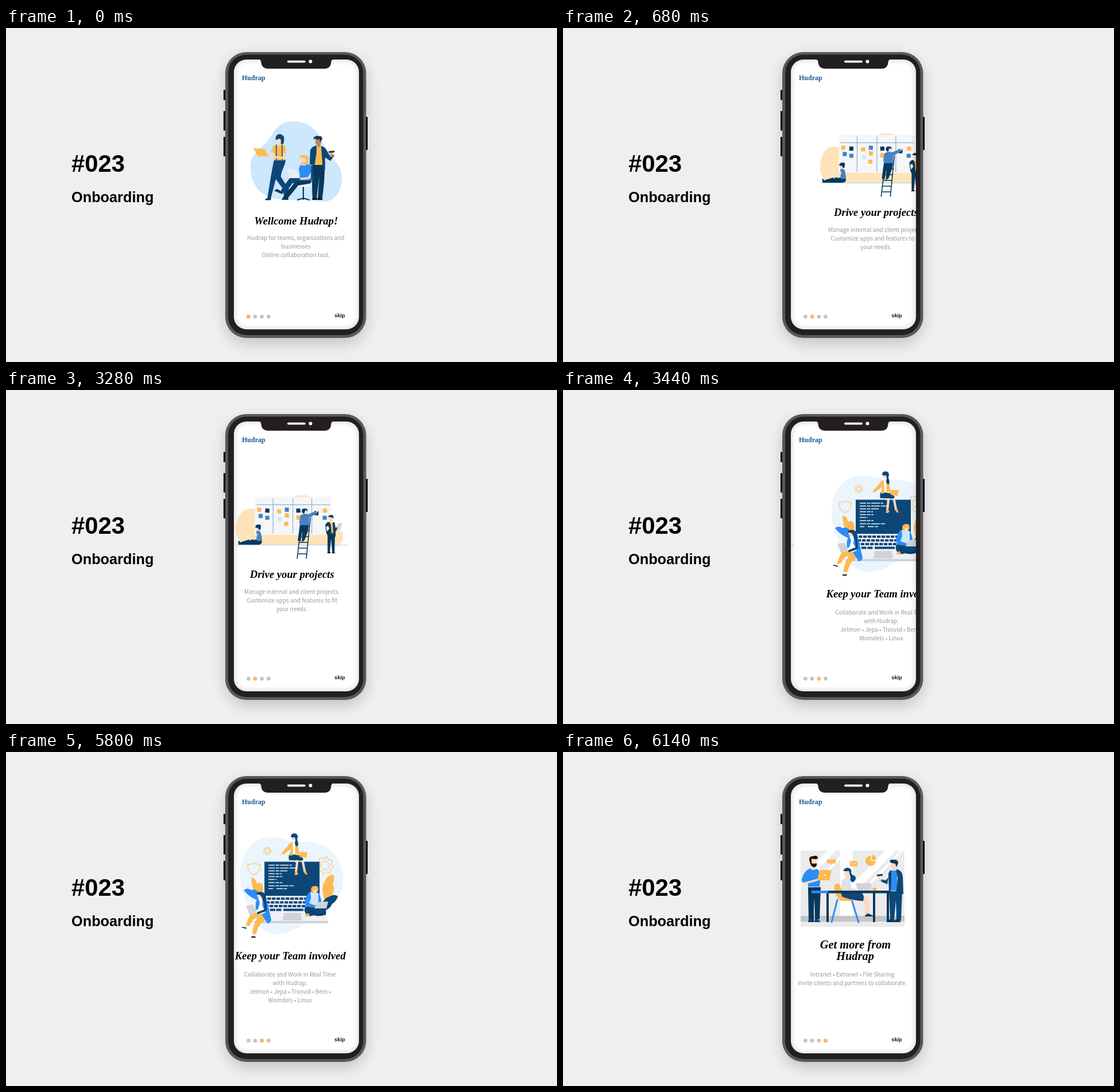
Animation, 960 px wide and 583 px high, one loop 8000 ms. Source, as an HTML page:

```html
<!DOCTYPE html>
<html lang="en">
<head>
<meta charset="utf-8">
<title>Onboarding</title>
<style>
  html, body { margin: 0; width: 100%; height: 100%; overflow: hidden; background: #efefef; }
  svg { display: block; width: 100vw; height: 100vh; }
  .n { fill: #0d4777; } .d { fill: #07395c; } .b { fill: #2d8cf5; } .m { fill: #4682c4; }
  .o { fill: #fdba51; } .s { fill: #fbd9c3; } .t { fill: #bd8064; } .p { fill: #cde7fd; }
  .g { fill: #d0d3d8; } .l { fill: #e9edf2; } .w { fill: #fff; } .k { fill: #111; }
  .ln { fill: none; stroke-linecap: round; stroke-linejoin: round; }
  .sn { stroke: #0d4777; } .sd { stroke: #07395c; } .sb { stroke: #2d8cf5; } .sm { stroke: #4682c4; }
  .so { stroke: #fdba51; } .ss { stroke: #fbd9c3; } .sw { stroke: #fff; } .st { stroke: #bd8064; }
  .big { font-family: "Liberation Sans", Arial, sans-serif; font-weight: 700; fill: #000; }
  .title { font: italic 700 18.6px "Liberation Serif", "Times New Roman", serif; text-anchor: middle; }
  .large { font-size: 20.4px; }
  .body { font: 400 10px "Noto Sans CJK JP", "Noto Sans CJK KR", "Noto Sans CJK SC", "Noto Sans CJK", "Noto Sans", sans-serif;
          fill: #999; text-anchor: middle; }
  .brand { font: 700 12px "Liberation Serif", "Times New Roman", serif; fill: #1b5896; }
  .skip { font: 700 9.2px "Liberation Sans", Arial, sans-serif; fill: #151515; }
</style>
</head>
<body>
<svg viewBox="0 0 960 583" preserveAspectRatio="none">
  <defs>
    <clipPath id="screen"><rect x="397" y="55" width="218" height="471" rx="22"/></clipPath>
    <filter id="soft" x="-20%" y="-20%" width="140%" height="140%"><feGaussianBlur stdDeviation="12"/></filter>
    <filter id="edge" x="-20%" y="-20%" width="140%" height="140%"><feGaussianBlur stdDeviation="5"/></filter>
  </defs>
  <rect width="960" height="583" fill="#efefef"/>
  <text class="big" x="114" y="251" font-size="41.8">#023</text>
  <text class="big" x="114" y="304.3" font-size="25.3">Onboarding</text>

  <!-- phone -->
  <rect x="382" y="50" width="246" height="501" rx="40" opacity=".18" filter="url(#soft)"/>
  <path d="M379 109q0-1 1-1h4v18h-4q-1 0-1-1zM379 146q0-1 1-1h4v34h-4q-1 0-1-1zM379 191q0-1 1-1h4v34h-4q-1 0-1-1zM626 155h3q1 0 1 1v56q0 1-1 1h-3z"/>
  <rect x="382" y="42" width="245.500" height="499" rx="37" fill="#58595b"/>
  <rect x="387" y="46.500" width="235.500" height="489.500" rx="32" fill="#231f20"/>
  <rect x="397" y="55" width="218" height="471" rx="22" fill="#fff"/>

  <g clip-path="url(#screen)">
    <g class="slide">
      <path class="p" d="M426 243C426 222 438 214 452 202C464 190 470 163 499 163C532 163 546 182 553 205C560 226 585 232 585 262C585 285 574 303 553 303C535 303 525 299 505 300C480 301 455 298 440 283C430 272 426 258 426 243Z"/>
      <!-- woman with laptop -->
      <path class="n" d="M467 230L487 230C487 240 479 249 479 260L494 283L488 288L470 264L461 299L455 299L461 262C463 250 465 240 467 230Z"/>
      <path class="d" d="M451 300.500q1-3 5-3.500h6l-1 3.500zM483 290l7-6 5 1-6 11z"/>
      <path class="n" d="M476 187q9 2 7 15l-7 2z"/>
      <path class="s" d="M473 199h6v8q-3 2-6 0z"/>
      <path class="o" d="M465 206L472 203.500Q476 208 480 203.500L486 205L488 218L485 231H467L468 219L462 218Z"/>
      <path class="ln sn" stroke-width="1.500" d="M471 204V230M481 204V230"/>
      <ellipse class="s" cx="475" cy="196.500" rx="4.300" ry="5.500"/>
      <path class="n" d="M469.500 195q0-10 8-10 8 2 7 10l-1 7-4 0q1-5-2-9-5 2-8 2z"/>
      <path class="o" d="M431 210L450 211L457 223L439 224Z"/>
      <path class="ln ss" stroke-width="3.500" d="M464 218L458 223M485 219L484 227L458 224"/>
      <path class="g" d="M439 223.500h19v1.500h-19z"/>
      <!-- chair and seated man -->
      <path class="l" d="M531 240q5-2 5 4v32q0 2-3 2h-27q-4-1-3-4l26-3z"/>
      <path class="ln sd" stroke-width="2.200" d="M518 278V299M508 300L518 297L528 300"/>
      <path class="ln sn" stroke-width="9" d="M528 267L497 266L484 284"/>
      <path class="ln sd" stroke-width="8" d="M526 268L507 271L491 291"/>
      <path class="d" d="M467 284l5-3 10 5-1 4zM482 297l4-8 6 3v8h-12z"/>
      <path class="b" d="M512 240Q521 235 530 239Q536 244 535 252L530 254V266H511Q513 254 510 248Z"/>
      <path class="ln ss" stroke-width="3.500" d="M533 253L527 262L514 263"/>
      <path class="l" d="M489 245L507 248L511 262H494Z"/>
      <path class="s" d="M515 231h8v8q-4 3-8 0z"/>
      <circle class="s" cx="519" cy="230" r="6"/>
      <path class="o" d="M511 224q5-4 13-1 5 3 3 11-2 5-8 5-5-1-5-5 5 2 9-1l-2-7q-5 1-9-1z"/>
      <!-- man with coffee -->
      <path class="d" d="M535 235H555C556 253 554 274 551 298H543L546 259L541 298H534Q532 263 535 235Z"/>
      <path class="k" d="M533 300q1-4 5-4h4v4zM542 300q1-4 5-4l6 4z"/>
      <path class="o" d="M539 207h12l2 32h-16z"/>
      <path class="n" d="M541 205Q532 207 530 214L529 238L535 240L537 265H531L532 239L538 238L541 217ZM549 206Q556 207 559 214L565 224L569 219L572 223L565 232L556 226L556 247H552Z"/>
      <path class="t" d="M541 198h7v8q-3 3-6 0z"/>
      <ellipse class="t" cx="544" cy="198.500" rx="5" ry="6.500"/>
      <path class="d" d="M536 195q-1-6 4-6 3-2 5 0 6-1 6 5l-3 5-2-5q-5 2-8-1z"/>
      <path class="o" d="M563 217l8-1-2 9h-4z"/>
      <path class="d" d="M562 215l10-1 .5 3-10 1z"/>
      <path class="ln st" stroke-width="2.500" d="M565 223L570 222"/>
      <text class="title" x="505.500" y="342.500">Wellcome Hudrap!</text>
      <text class="body"><tspan x="505" y="370.300">Hudrap for teams, organizations and</tspan><tspan x="505" y="385.300">businesses</tspan><tspan x="505" y="399.700">Online collaboration tool.</tspan></text>
    </g>

    <g class="slide">
      <path fill="#fee3b8" d="M436 207C416 207 410 228 411 246C412 260 419 270 434 270H588C600 268 601 243 585 242L572 250H462C462 230 457 207 436 207ZM506 188Q525 179 546 188Z"/>
      <rect x="443" y="186.500" width="133" height="66.500" rx="2" fill="#f5f6f7"/>
      <path fill="none" stroke="#6fa5d2" d="M446 200.200H574M475 189V251M509.500 189V251M542.500 189V251"/>
      <path stroke="#a6cfee" d="M411 270.700H605"/>
      <g id="notes"></g>
      <!-- seated woman -->
      <path class="d" d="M455 261Q457 269 451 270H416L415 266L430 264L446 261ZM414 264l2-1 3 7h-4z"/>
      <path class="ln sd" stroke-width="4" d="M421 267L437 262L449 267"/>
      <path class="m" d="M446 246Q452 244 454 250L456 262Q450 265 446 262Z"/>
      <path class="l" d="M429 256l3-1 5 7-2 1z"/>
      <path class="ln ss" stroke-width="2" d="M447 252L444 260L437 260"/>
      <circle class="s" cx="448" cy="241" r="3.700"/>
      <path class="d" d="M444 240q0-5 5-5 4-1 5 2l-1 7q-3 1-4-3z"/>
      <!-- man on ladder -->
      <path class="ln sd" stroke-width="1.600" d="M517 294L524 234M533 294L540 223M518 286H534M519 276H535M520 266H536M521 256H537M522 246H538"/>
      <path class="d" d="M522 233H538L536 246L530 262L525 266L526 246L523 264L518 263Z"/>
      <path class="m" d="M523 219Q529 214 536 217L550 211L552 215L538 223V236H522Z"/>
      <path class="ln sm" stroke-width="3" d="M524 220L522 231L527 233"/>
      <path class="ln ss" stroke-width="2" d="M551 213L554 210"/>
      <circle class="s" cx="530" cy="212" r="4"/>
      <path class="d" d="M525 211q1-5 6-4 4 0 4 4l-4-1-2 6q-4-1-4-5z"/>
      <!-- man in suit -->
      <path class="d" d="M570 250H583L582 283H578L576 259L574 283H570Z"/>
      <path class="k" d="M569 285q1-3 6-2v2zM577 285q1-3 4-2l3 2z"/>
      <path class="d" d="M573 230Q566 231 566 238L568 250L571 256H584L584 246L591 241L588 238L584 241L582 231Z"/>
      <path class="w" d="M573 230h6l-1 9z"/>
      <path class="o" d="M575 231h4l1 18-3 2z"/>
      <path class="l" d="M567 239l4-2 2 5-4 5z"/>
      <ellipse class="s" cx="576" cy="225.500" rx="3.600" ry="5"/>
      <path class="d" d="M571 222q1-4 6-4 4 0 3 6l-4-2z"/>
      <path class="g" d="M588 233l7-1-2 11-7 1z"/>
      <text class="title" x="508" y="328.300">Drive your projects</text>
      <text class="body"><tspan x="508" y="356.300">Manage internal and client projects.</tspan><tspan x="508" y="371">Customize apps and features to fit</tspan><tspan x="508" y="385.500">your needs.</tspan></text>
    </g>

    <g class="slide">
      <path fill="#ebf5fe" d="M418 213C418 175 440 150 470 149C495 148 505 158 530 157C570 156 597 185 597 222C597 252 580 268 558 280C535 294 512 318 482 318C450 317 442 290 432 268C422 250 418 235 418 213Z"/>
      <g id="gears" class="ln so"></g>
      <path class="ln so" d="M431 196Q438 197 441.500 193.500Q446 197 452 196Q454 209 441.500 214.500Q429 209 431 196Z"/>
      <!-- plants -->
      <path class="o" d="M447 250Q437 238 437 219Q444 219 447 230Q453 226 457 233Q459 243 455 252ZM563 252Q558 235 567 222Q572 214 580 214Q583 222 579 231Q584 238 578 249Q570 261 565 262Z"/>
      <path class="b" d="M449 259Q432 253 424 241Q430 236 437 241Q446 237 451 248Z"/>
      <path class="n" d="M558 272Q563 254 574 252Q582 247 588 252Q585 261 578 265Q574 275 563 277Z"/>
      <!-- laptop -->
      <path class="n" d="M460 191.500H556V251H460Z"/>
      <path stroke="#e8f3fb" stroke-width="1.400" stroke-dasharray="11 1.500 6 1.500 15 1.500" d="M467 197.500H508M467 202.500H518M467 207.500H500M467 212.500H490M467 217.500H491M467 222.500H481M467 228H491M467 233.500H511M467 238.500H475M481 238.500H499"/>
      <path fill="#edf0f4" d="M460 251H556L571 295H444Z"/>
      <path class="sn" stroke-width="4" stroke-dasharray="6.300 1.700" d="M465 256H552M463 262.500H554M461 269H556"/>
      <path class="sn" stroke-width="4" stroke-dasharray="9 1.700" d="M459 275.500H491M530 275.500H557"/>
      <path class="sn" stroke-width="4" d="M493 275.500H528"/>
      <path fill="#cfd2d6" d="M494 281H523L525 294H491Z"/>
      <path fill="#d0d3d8" d="M441 295H571V297.500Q570 299 568 299H444Q441 298 441 295Z"/>
      <!-- woman on top -->
      <path class="ln ss" stroke-width="4" d="M508 187L517 192L515 209M519 186L527 192L530 208"/>
      <path class="o" d="M512 214l3-7 4 5-3 3zM528 209l4-2 3 7h-3z"/>
      <path class="n" d="M504 178H520L528 187Q526 191 518 189H503Q501 183 504 178Z"/>
      <path class="w" d="M509 158h6v21h-8z"/>
      <path class="o" d="M509 157Q503 159 500 165L490 176L493 179L506 169L504 181L510 180ZM513 157Q519 158 519 166L521 180H514Z"/>
      <path class="ln ss" stroke-width="2" d="M491 177L487 180M516 178L522 180"/>
      <path class="o" d="M521 174l14 1-2 10-12-2z"/>
      <circle class="s" cx="511" cy="149.500" r="4.500"/>
      <path class="n" d="M506 148q0-6 6-6 6 0 6 7-2 4 0 7 2 6-1 9-4-2-4-7 2-4 0-9-4 1-7-1z"/>
      <!-- woman on the left -->
      <path class="o" d="M463 280L437 281Q431 291 427 303L433 304L442 291L448 290Q440 302 438.500 317L445.500 318Q449 304 455 298L465 290Z"/>
      <path class="ln ss" stroke-width="2.500" d="M429 303L427 306M442 317L441 321"/>
      <path class="k" d="M421 305l8 2-1 1.500-7-2zM437 322l8 0-1 2h-7z"/>
      <path class="w" d="M448 255h9l4 28h-12z"/>
      <path class="b" d="M457 254Q464 255 466 267L472 293Q470 299 465 299L455 283L462 280L456 268ZM449 255Q443 260 445 276L449 274L452 263Z"/>
      <path class="ln sn" stroke-width="4" d="M461 261L462 276L449 281"/>
      <circle class="s" cx="452" cy="250" r="5"/>
      <path class="n" d="M446 249q0-5 7-5 7 0 9 7 3 7 0 13-5-2-6-8-1-5-5-7z"/>
      <path class="g" d="M428 268L441 267L447 281L434 284Z"/>
      <!-- man on the right -->
      <path class="n" d="M530 278Q528 270 537 267L563 271Q569 275 567 284Q557 288 546 285Q534 290 530 278Z"/>
      <path class="ln sd" stroke-width="2" d="M535 274L552 285L566 281"/>
      <path class="p" d="M538 245Q548 242 555 247L558 268H534Z"/>
      <path class="b" d="M540 244Q532 248 530 263L533 270L549 272V268L538 264L541 255ZM554 247Q559 252 559 264L554 266Z"/>
      <circle class="s" cx="547.500" cy="241" r="5"/>
      <path class="o" d="M541 241q0-7 6-7 6-1 7 5l-1 5-4-4-4 1 1 5q-4 0-5-5z"/>
      <path class="o" d="M531 284l5-3 4 6h-8z"/>
      <path class="g" d="M552 262L571 261L568 273H547Z"/>
      <text class="title" x="505" y="361.700">Keep your Team involved</text>
      <text class="body"><tspan x="504.500" y="392.300">Collaborate and Work in Real Time</tspan><tspan x="504.500" y="407.200">with Hudrap.</tspan><tspan x="504.500" y="421.700">Jelmon • Jepa • Trosvid • Bem •</tspan><tspan x="504.500" y="436.500">Womdels • Linux</tspan></text>
    </g>

    <g class="slide">
      <path fill="#ebebec" d="M414 172H483V287H414ZM505 172H595V287H505Z"/>
      <path class="w" d="M461 172H475L414 237V222ZM483 181V187L431 244H425ZM561 172H580L505 249V230ZM588 172H593L520 247H515Z"/>
      <path fill="#c4c5c7" d="M414 286H595V296H414Z"/>
      <path fill="#ebebec" d="M414 296H595V305H414Z"/>
      <!-- icons -->
      <path class="o" d="M460 187.500H475V194.500H469L466 197V194.500H460ZM499.500 190H513V199.500H499.500ZM536 181V190H545A9 9 0 1 1 536 181ZM538 180A8 8 0 0 1 546 188H538Z"/>
      <path class="ln sw" stroke-width=".9" d="M464 191h.1M467.500 191h.1M471 191h.1M500 191L506.200 196L512.500 191"/>
      <!-- man with laptop -->
      <path class="d" d="M427 236H449L447 292H439L438 255L436 292H428Z"/>
      <path class="n" d="M427 297q0-6 4-6h5v6zM438 297q0-6 4-6l6 4v2z"/>
      <path class="b" d="M429 204Q437 200 445 206L449 218L447 235H427V228L418 228Q414 225 417 219Q421 207 429 204Z"/>
      <path class="ln ss" stroke-width="3.500" d="M421 229L433 226L447 222"/>
      <path class="s" d="M431 196h9v9q-4 2-8 0z"/>
      <ellipse class="s" cx="436.500" cy="191" rx="5" ry="7"/>
      <path class="k" d="M429 188q0-7 7-6 6-3 8 2 0 3-3 3-5 0-8-1l0 8q4 2 9 0 1 6-4 7-5 0-7-6z"/>
      <path class="o" d="M447 206H468L464 224H443Z"/>
      <circle class="w" cx="457" cy="215" r="1.500"/>
      <!-- chair and seated woman -->
      <path class="ln sb" stroke-width="3" d="M478 258L468 297M503 258L515 297"/>
      <path class="o" d="M473 233Q474 229 481 230L488 246Q495 251 504 252L508 260H485Q472 252 473 233Z"/>
      <path class="ln ss" stroke-width="8" d="M511 253L528 256L531 282"/>
      <path class="d" d="M526 286q3-4 6-4l9 4q0 1-2 1h-13z"/>
      <path class="n" d="M484 245H520Q526 251 523 260Q500 259 486 252Z"/>
      <path class="p" d="M485 224Q492 219 500 223L504 244H485Z"/>
      <path class="ln ss" stroke-width="4" d="M487 226L489 238L510 241"/>
      <path class="n" d="M499 211q5 0 5 4 6 0 6 6-2 6-7 6-4-4-2-8z"/>
      <path class="s" d="M492 215h7v8q-3 2-7 0z"/>
      <ellipse class="s" cx="495" cy="212" rx="5" ry="6"/>
      <path class="n" d="M488.500 208q1-6 7-6 7 0 7 8l-3 4-1-6z"/>
      <path class="g" d="M510 229H537V242H514Z"/>
      <path class="o" d="M539 237h7v5h-6z"/>
      <!-- man with card -->
      <path class="n" d="M568 243H591L589 293H581L580 258L577 293H570Z"/>
      <path class="d" d="M566 297q0-5 6-5h5v5zM577 297q0-5 5-5h6v5z"/>
      <path class="b" d="M569 207h13v35h-13z"/>
      <path class="n" d="M580 204Q591 206 592 218L593 248H580L583 220ZM572 206Q566 209 567 217L568 245H571L572 225ZM567 219l-2 12-13-6 2-3 8 2z"/>
      <path class="ln ss" stroke-width="2.500" d="M554 224L550 219"/>
      <path class="d" d="M547 214l10-1v3l-10 1z"/>
      <path class="s" d="M573 198h8v8q-4 2-7 0z"/>
      <ellipse class="s" cx="576.500" cy="197" rx="5" ry="7"/>
      <path class="d" d="M569 192q1-5 7-4 8-1 8 6l-3 7-2-6q-5 0-10-3z"/>
      <!-- table -->
      <path class="d" d="M459 246H463V297H459ZM540 246H544V297H540ZM433 246H437V297H433ZM564 246H568V297H564Z"/>
      <path class="d" d="M462 242H569V246.500H462Z"/>
      <path class="b" d="M433 242H462V246.500H433Z"/>
      <text class="title large"><tspan x="509.500" y="343">Get more from</tspan><tspan x="509" y="362.800">Hudrap</tspan></text>
      <text class="body"><tspan x="504" y="392.300">Intranet • Extranet • File Sharing</tspan><tspan x="504" y="407">Invite clients and partners to collaborate.</tspan></text>
    </g>

    <rect x="395" y="53" width="222" height="475" rx="24" fill="none" stroke="#000" stroke-width="6" opacity=".2" filter="url(#edge)"/>
  </g>

  <path fill="#231f20" d="M440 54.500Q444 55 444.500 59Q445 71 457 71H555Q566 71 566.500 59Q567 55 571 54.500Z"/>
  <rect x="490" y="56.800" width="32" height="3.600" rx="1.800" fill="#fff"/>
  <circle cx="530.500" cy="58.600" r="3" fill="#fff"/>
  <text class="brand" x="411" y="91">Hudrap</text>
  <g id="dots"></g>
  <text class="skip" x="572.300" y="505.300">skip</text>
</svg>
<script>
  const LOOP = 8000, TICK = 20, MOVE = 360, GAP = 253;
  const starts = [480, 3260, 5780];
  const byId = id => document.getElementById(id);

  function add(parent, tag, attrs) {
    const el = document.createElementNS('http://www.w3.org/2000/svg', tag);
    for (const key in attrs) el.setAttribute(key, attrs[key]);
    return parent.appendChild(el);
  }

  function gear(cx, cy, r, depth) {
    let d = '';
    for (let i = 0; i < 32; i++) {
      const a = (i + .5) * Math.PI / 16, q = i % 4 < 2 ? r : r - depth;
      d += (i ? 'L' : 'M') + (cx + q * Math.cos(a)).toFixed(2) + ' ' + (cy + q * Math.sin(a)).toFixed(2);
    }
    add(byId('gears'), 'path', { d: d + 'Z' });
    add(byId('gears'), 'circle', { cx, cy, r: r * .5 });
  }
  gear(465, 173, 7, 1.7);
  gear(565.5, 198, 15, 3.2);

  const notes = {
    o: [[451, 209], [485.5, 212], [499, 219], [498, 233.5], [519, 222.5], [565.5, 210.5]],
    d: [[465, 210.5], [519, 210.5], [550.5, 215]],
    m: [[453.5, 220], [465, 223], [499, 209], [565, 223]],
    p: [[487, 225.5], [533, 210]]
  };
  for (const tone in notes) notes[tone].forEach(([x, y], i) => add(byId('notes'), 'rect', {
    class: tone, x: x - 3.6, y: y - 3.6, width: 7.2, height: 7.2, transform: `rotate(${i % 2 ? -4 : 5} ${x} ${y})`
  }));

  const slides = [...document.querySelectorAll('.slide')];
  const dots = slides.map((_, i) => {
    const spot = { cx: 422.4 + i * 11.7, cy: 503.9, r: 3.3 };
    add(byId('dots'), 'circle', { ...spot, fill: '#c4c4c4' });
    return add(byId('dots'), 'circle', { ...spot, fill: '#fdb94e' });
  });

  // cubic-bezier(.25, .1, .25, 1)
  function ease(x) {
    if (x <= 0) return 0;
    if (x >= 1) return 1;
    const at = (p, q, s) => 3 * p * s * (1 - s) ** 2 + 3 * q * s * s * (1 - s) + s ** 3;
    let lo = 0, hi = 1;
    for (let i = 0; i < 24; i++) {
      const mid = (lo + hi) / 2;
      if (at(.25, .25, mid) < x) lo = mid; else hi = mid;
    }
    return at(.1, 1, lo);
  }

  function draw(now) {
    const t = Math.floor((now % LOOP + .01) / TICK) * TICK;
    const pos = starts.reduce((sum, s) => sum + ease((t - s) / MOVE), 0);
    slides.forEach((slide, i) => {
      slide.setAttribute('transform', `translate(${((i - pos) * GAP).toFixed(2)} 0)`);
      dots[i].setAttribute('opacity', Math.max(0, 1 - Math.abs(i - pos)));
    });
    requestAnimationFrame(draw);
  }
  draw(performance.now());
</script>
</body>
</html>
```
